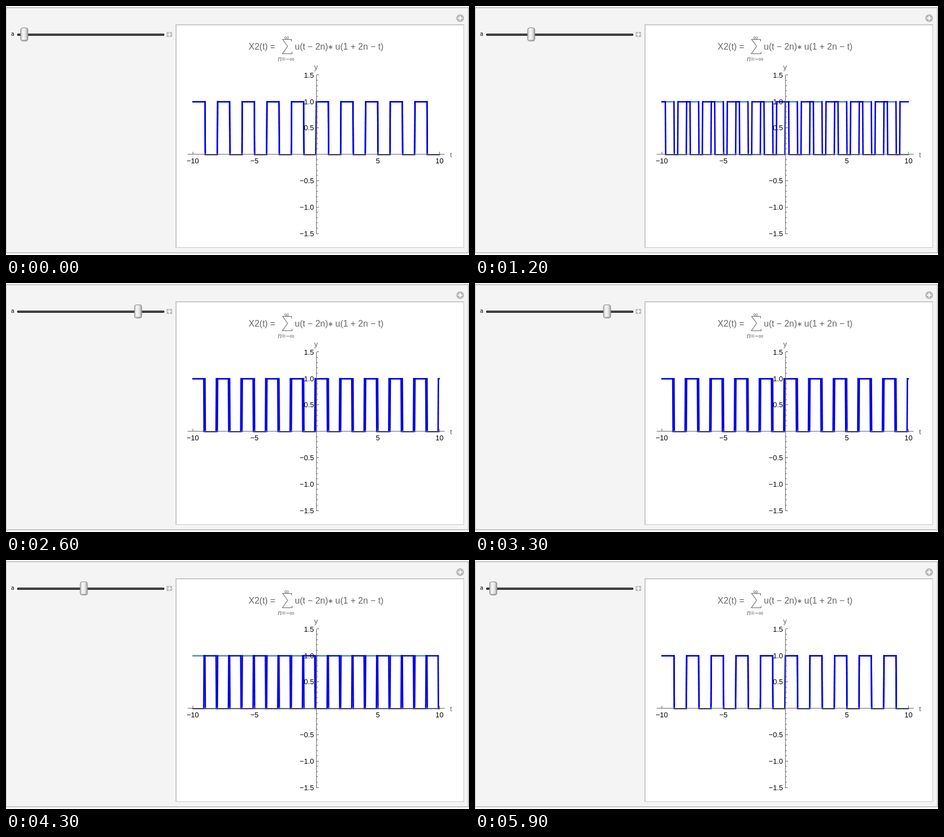
These frames come from a looping animation (836x451 px, 6000 ms). An HTML page with a canvas:

```html
<!DOCTYPE html>
<html lang="en">
<head>
<meta charset="utf-8">
<title>Shifted square wave</title>
<style>
  html, body { margin: 0; width: 100%; height: 100%; overflow: hidden; background: #fff; }
  canvas { display: block; }
</style>
</head>
<body>
<canvas id="stage" width="836" height="451"></canvas>
<script>
const ctx = document.getElementById('stage').getContext('2d');
const SANS = '"Liberation Sans", Arial, sans-serif';
const GRAY = '#666';
const BLUE = '#0000e6';
const TEAL = '#5088b4';
const LOOP = 6000, STEP = 100;

const px = t => 560 + t * 22.27;
const py = y => 268.8 - y * 95.6;

function line(points, color, width = 1) {
  ctx.beginPath();
  points.forEach(([x, y], i) => i ? ctx.lineTo(x, y) : ctx.moveTo(x, y));
  ctx.strokeStyle = color;
  ctx.lineWidth = width;
  ctx.stroke();
}

function rect(x, y, w, h, color) {
  ctx.fillStyle = color;
  ctx.fillRect(x, y, w, h);
}

function text(s, x, y, size, color, align = 'left', style = '', family = SANS) {
  ctx.font = `${style} ${size}px ${family}`;
  ctx.textAlign = align;
  ctx.fillStyle = color;
  ctx.fillText(s, x, y);
}

function plus(x, y, r) {
  rect(x - r, y - 1, 2 * r, 2, '#fff');
  rect(x - 1, y - r, 2, 2 * r, '#fff');
}

function panels() {
  rect(0, 0, 836, 451, '#fff');
  rect(0, 2, 836, 446, '#c4c4c4');
  rect(1, 4, 833, 442, '#f4f4f4');
  rect(306, 33, 521, 405, '#c8c8c8');
  rect(308, 35, 518, 402, '#fff');

  ctx.beginPath();
  ctx.arc(820, 22, 7, 0, 2 * Math.PI);
  ctx.fillStyle = '#b9b9b9';
  ctx.fill();
  plus(820, 22, 4);
}

function slider(a) {
  text('a', 9, 54, 10, '#000', 'left', '', '"DejaVu Sans", sans-serif');
  ctx.beginPath();
  ctx.roundRect(20, 50, 266, 4, 2);
  ctx.fillStyle = '#1c1c1c';
  ctx.fill();
  rect(22, 51.5, 262, 1, '#808080');
  rect(290, 47, 10, 9, '#bcbcbc');
  plus(295, 51.5, 3.5);

  const x = Math.round((33.1 + a * 97.8) * 2) / 2;
  const shade = ctx.createLinearGradient(x - 6, 0, x + 6, 0);
  shade.addColorStop(0, '#c4c4c4');
  shade.addColorStop(0.3, '#f8f8f8');
  shade.addColorStop(0.65, '#e6e6e6');
  shade.addColorStop(1, '#a8a8a8');
  ctx.beginPath();
  ctx.roundRect(x - 6.5, 39.5, 13, 24, 3.5);
  ctx.fillStyle = shade;
  ctx.fill();
  ctx.strokeStyle = '#858585';
  ctx.lineWidth = 1;
  ctx.stroke();
  rect(x - 4, 61, 8, 2, 'rgba(90,90,90,.35)');
}

function title() {
  text('X2(t) =', 438, 79, 16, GRAY);
  text('u(t − 2n)', 521.5, 79, 16, GRAY);
  text('u(1 + 2n − t)', 594.5, 79, 16, GRAY);
  for (let k = 0; k < 3; k++) {
    const c = 3.7 * Math.cos(Math.PI / 2 + k * Math.PI / 3);
    const s = 3.7 * Math.sin(Math.PI / 2 + k * Math.PI / 3);
    line([[586 - c, 74.5 - s], [586 + c, 74.5 + s]], GRAY, 1.2);
  }
  line([[515.5, 64], [515.5, 60.5], [499.5, 60.5], [508.5, 73], [499, 86.5], [516.5, 86.5], [516.5, 83]], GRAY, 1.1);
  text('∞', 506.7, 61, 12, GRAY, 'center');
  text('n=−∞', 491, 100, 12, GRAY, 'left', 'italic');
}

// Square wave: high on [2n - shift, 2n + 1 - shift).
function wave(shift, high, low) {
  const edges = [-10];
  const first = Math.floor(-10 + shift) + 1;
  for (let k = first; k - shift < 10 - 1e-6; k++) {
    if (k - shift > -10 + 1e-6) edges.push(k - shift);
  }
  edges.push(10);

  const top = py(1) + 0.3, bottom = py(0);
  const isHigh = t => Math.abs(Math.floor(t + shift)) % 2 === 0;
  const flats = edges.slice(1).map((end, i) => [edges[i], end, isHigh((edges[i] + end) / 2)]);
  for (const [from, to, up] of flats) {
    const y = up ? top : bottom + 0.4;
    line([[px(from) - 0.8, y], [px(to) + 0.8, y]], up ? high : low, up ? 2.5 : 2);
  }
  for (const [from, , up] of flats.slice(1)) {
    const x = px(from), lean = up ? 0.3 : -0.3;
    line([[x - lean, bottom + 1.2], [x + lean, top - 1.2]], BLUE, 2.6);
  }
}

function axes() {
  line([[328, 268.5], [792, 268.5]], GRAY);
  line([[560.5, 125], [560.5, 413]], GRAY);
  for (let k = -10; k <= 10; k++) {
    const x = Math.floor(px(k)) + 0.5;
    line([[x, 268], [x, k % 5 ? 266 : 264]], GRAY);
  }
  for (let k = -15; k <= 15; k++) {
    const y = Math.floor(268.5 - k * 9.57) + 0.5;
    line([[561, y], [k % 5 ? 563 : 565, y]], GRAY);
  }
  const label = v => String(v).replace('-', '−');
  for (const k of [-10, -5, 5, 10]) text(label(k), px(k), 285, 13, '#000', 'center');
  for (const k of [-1.5, -1, -0.5, 0.5, 1, 1.5]) {
    text(label(k.toFixed(1)), 556, Math.round(273.2 - k * 95.7), 13, '#000', 'right');
  }
  text('y', 559.7, 115, 13, GRAY, 'center');
  text('t', 803.5, 274, 13, GRAY, 'center');
}

function draw(ms) {
  const i = Math.floor((ms % LOOP) / STEP);
  const a = Math.max(0, Math.min(i, 59 - i) - 5) / 10;
  panels();
  slider(a);
  title();
  wave(0, TEAL, '#55686f');
  wave(a, BLUE, '#1c1c50');
  axes();
}

const start = performance.now();
function tick() {
  draw(performance.now() - start);
  requestAnimationFrame(tick);
}
tick();
</script>
</body>
</html>
```
